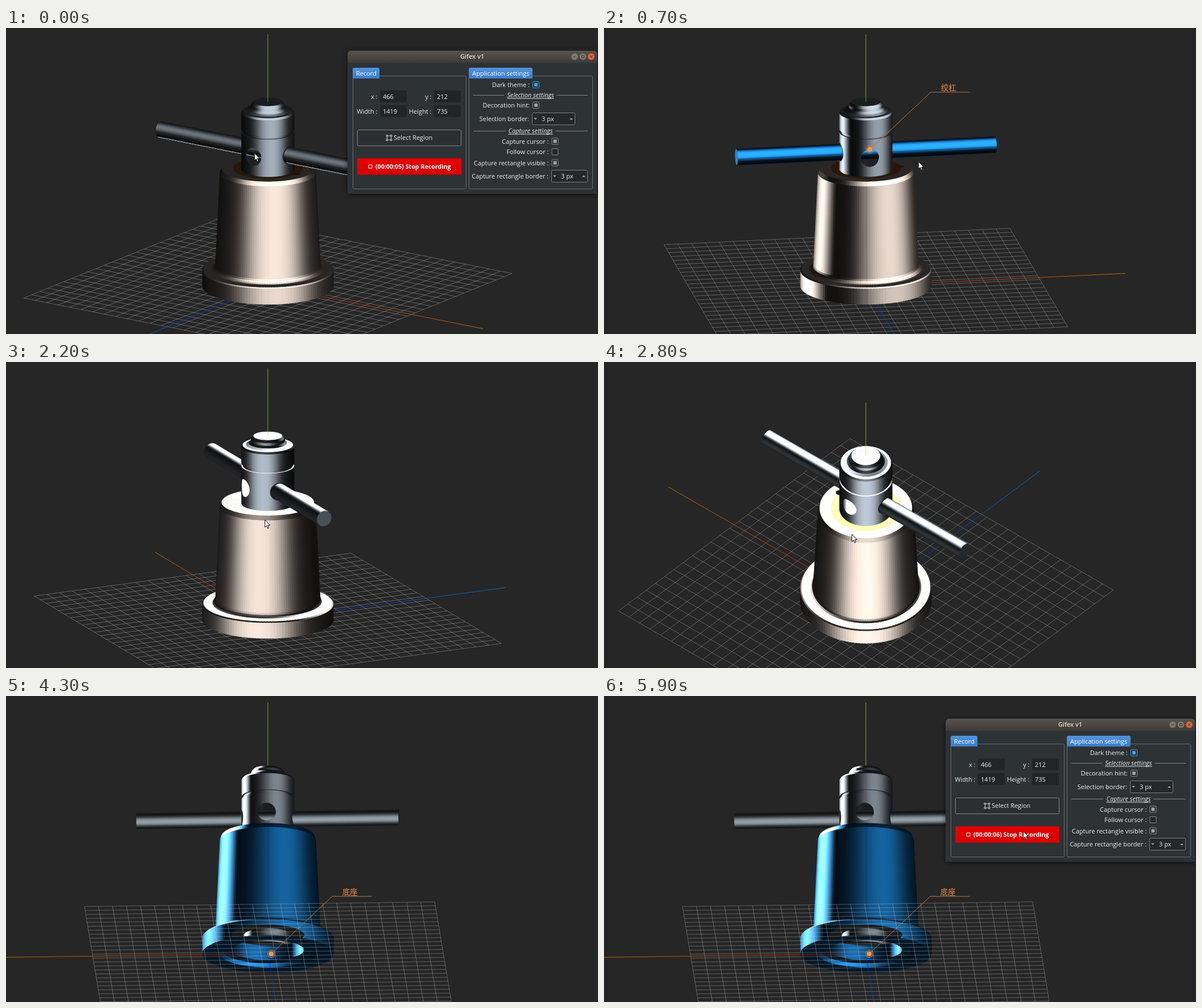
An HTML page with a canvas for the animation above (6 s loop, 1040 by 539 pixels).

```html
<!DOCTYPE html>
<html lang="en">
<head>
<meta charset="utf-8">
<title>Screw jack viewer</title>
<style>
html, body { margin: 0; width: 100%; height: 100%; overflow: hidden; background: #262626; }
canvas { display: block; width: 1040px; height: 539px; }
</style>
</head>
<body>
<canvas id="stage" width="1040" height="539"></canvas>
<script>
const ctx = document.getElementById('stage').getContext('2d');
const LOOP = 6000, STEP = 100, RAD = Math.PI / 180, TAU = Math.PI * 2;
const UI = '"Open Sans", "Noto Sans", sans-serif';

// camera drags: start, end, yaw and pitch reached (degrees)
const DRAGS = [
  [0, 300, -31, 16.6], [400, 700, 9.5, 16.6], [700, 900, 14, 7], [1000, 1700, 88, -14.6],
  [1800, 2500, 136, 40], [2500, 2800, 138.7, 41], [2800, 3200, 176, 37.4], [3400, 3900, 177.3, -16.5]
];
// pointer path: time, x, y
const PATH = [
  [0, 436, 220], [400, 441, 221], [700, 552, 235], [1500, 477, 248], [2800, 435, 303],
  [3400, 479, 330], [3900, 452, 287], [4200, 6, 339], [5100, 88, 345], [5700, 738, 237], [6000, 735, 238]
];

const BRONZE = [1, .93, .88], STEEL = [.7, .75, .8], ORANGE = [1, .6, .28], BLUE = [.13, .62, 1];
const LIGHTS = [{ az: 52, el: 38, k: 3.4 }, { az: -136, el: -32, k: 1.5 }];

// concave quarter curve from radius r + w inward to r
const cove = (r, w, h, rise) => [0, 1, 2, 3, 4].map(i => {
  const a = i / 4 * Math.PI / 2;
  return [r + w * (1 - Math.sin(a)), h + rise * (1 - Math.cos(a))];
});

// lathe outlines as [radius, height]
const BASE = [[115, 0], [115, 29], [113, 31], ...cove(92, 8, 31, 9), [84, 208], [81, 216], [61, 216]];
const RING = [[61, 216], [46, 216]];
const BODY = [[46, 214], [46, 283], [43, 283], [43, 288], [46, 288], [46, 318],
  ...cove(28.5, 15.5, 321.5, 12), [25, 338], [0, 338]];
const SCREW = [[0, 12], [36, 12], [42, 18], [42, 34], [64, 34]];
const CAVITY = [[64, 34], [64, 7], [80, 6], [85, 0], [115, 0]];

const GRID = 308, CELLS = 25, AXIS = 462, BODY_R = 46, ROD_H = 248, ROD_R = 14, ROD_END = 230.5;
let yaw, st, ct, s, c, lamps;

const dot = (a, b) => a[0] * b[0] + a[1] * b[1] + a[2] * b[2];
const mix = (a, b, f) => a + (b - a) * f;

function camera(t) {
  let y = -35, p = 16.6;
  for (const [from, to, y1, p1] of DRAGS) {
    const f = Math.max(0, Math.min(1, (t - from) / (to - from)));
    y = mix(y, y1, f);
    p = mix(p, p1, f);
  }
  return [y, p];
}

function pointerAt(t) {
  const i = PATH.findIndex(k => k[0] > t), a = PATH[i - 1], b = PATH[i];
  const f = (t - a[0]) / (b[0] - a[0]);
  return [mix(a[1], b[1], f), mix(a[2], b[2], f)];
}

function setView(yawDeg, pitchDeg) {
  yaw = yawDeg * RAD;
  st = Math.sin(yaw); ct = Math.cos(yaw);
  s = Math.sin(pitchDeg * RAD); c = Math.cos(pitchDeg * RAD);
  lamps = LIGHTS.map(({ az, el, k }) => {
    const f = az * RAD + yaw, e = el * RAD;
    const v = [Math.cos(e) * Math.sin(f), Math.sin(e), Math.cos(e) * Math.cos(f)];
    const sum = [v[0], v[1] + s, v[2] + c], len = Math.hypot(...sum);
    const h = sum.map(q => q / len);
    return { v, k, h, graze: (1 - h[1] * s - h[2] * c) ** 2 };
  });
}

// x: right, h: up, d: toward the viewer
const flat = (x, h, d) => [460 + x, 294 + (167 - h) * c + s * d];
const world = (X, h, Z) => flat(X * ct + Z * st, h, Z * ct - X * st);
const faces = n => n[1] * s + n[2] * c > 0;

// metallic highlight plus a white sheen at grazing angles
function shade(mat, n) {
  let sum = .05, sheen = 0;
  for (const l of lamps) {
    const nl = dot(n, l.v);
    if (nl <= 0) continue;
    const spec = l.k * Math.min(1, 3 * nl) * Math.max(0, dot(n, l.h)) ** 9;
    sum += .1 * nl + spec;
    sheen += spec * l.graze;
  }
  const tone = 1.1 * (1 - Math.exp(-1.4 * sum));
  return `rgb(${mat.map(m => Math.min(255, Math.round(255 * (m * tone + sheen)))).join()})`;
}

function trace(pts) {
  ctx.beginPath();
  pts.forEach(p => ctx.lineTo(p[0], p[1]));
  ctx.closePath();
}

function facet(pts, color) {
  trace(pts);
  ctx.fillStyle = ctx.strokeStyle = color;
  ctx.lineWidth = .4;
  ctx.fill();
  ctx.stroke();
}

function line(pts, color, width = 1) {
  ctx.beginPath();
  pts.forEach(p => ctx.lineTo(p[0], p[1]));
  ctx.strokeStyle = color;
  ctx.lineWidth = width;
  ctx.stroke();
}

function circle(x, y, r, fill, stroke) {
  ctx.beginPath();
  ctx.arc(x, y, r, 0, TAU);
  if (fill) { ctx.fillStyle = fill; ctx.fill(); }
  if (stroke) { ctx.strokeStyle = stroke; ctx.lineWidth = 1; ctx.stroke(); }
}

const loop = (n, at) => Array.from({ length: n }, (_, k) => at(k / n * TAU));

// facets around an axis, each reaching under the next so no seam shows
function wrap(count, mat, normal, low, high) {
  const step = TAU / count;
  for (let k = 0; k < count; k++) {
    const a = k * step, b = a + step * 1.5, n = normal(a + step / 2);
    if (faces(n)) facet([low(a), low(b), high(b), high(a)], shade(mat, n));
  }
}

function lathe(outline, mat, downward) {
  const last = outline.length - 1;
  for (let i = 0; i < last; i++) {
    const j = downward ? last - 1 - i : i;
    const [r0, h0] = outline[j], [r1, h1] = outline[j + 1];
    const len = Math.hypot(h1 - h0, r1 - r0), nr = (h1 - h0) / len, nh = (r0 - r1) / len;
    const at = (r, h) => f => flat(r * Math.sin(f), h, r * Math.cos(f));
    wrap(140, mat, f => [nr * Math.sin(f), nh, nr * Math.cos(f)], at(r0, h0), at(r1, h1));
  }
}

const rodPoint = (X, f) => world(X, ROD_H + ROD_R * Math.sin(f), ROD_R * Math.cos(f));

function tube(mat, from, to) {
  wrap(60, mat, f => [Math.cos(f) * st, Math.sin(f), Math.cos(f) * ct],
    f => rodPoint(from(f), f), f => rodPoint(to, f));
}

function rodHalf(mat, side) {
  tube(mat, f => side * Math.sqrt(BODY_R ** 2 - (ROD_R * Math.cos(f)) ** 2), side * ROD_END);
  const n = [side * ct, 0, -side * st];
  if (faces(n)) facet(loop(32, f => rodPoint(side * ROD_END, f)), shade(mat, n));
}

function bore(az, open, rodMat) {
  const mid = Math.atan2(Math.sin(az + yaw), Math.cos(az + yaw)), R = 16, edge = Math.PI / 2;
  if (Math.abs(mid) > 1.85) return;
  const pts = loop(36, f => {
    const phi = Math.max(-edge, Math.min(edge, mid + Math.asin(R * Math.cos(f) / BODY_R)));
    return flat(BODY_R * Math.sin(phi), ROD_H + R * Math.sin(f), BODY_R * Math.cos(phi));
  });
  if (!open) return facet(pts, '#17191c');
  const x = 460 + BODY_R * Math.sin(mid), g = ctx.createLinearGradient(x - 16, 0, x + 16, 0);
  g.addColorStop(0, '#121315');
  g.addColorStop(.2, '#24272a');
  g.addColorStop(.4, shade(STEEL, [0, Math.sign(s) || 1, 0]));
  ctx.save();
  trace(pts);
  ctx.clip();
  ctx.fillStyle = g;
  ctx.fillRect(x - 40, 0, 80, 539);
  tube(rodMat, () => -BODY_R, BODY_R);
  ctx.restore();
}

function axis(dir, start, near, far) {
  const [a, o, b] = [start, 0, AXIS].map(q => world(...dir.map(v => v * q)));
  const g = ctx.createLinearGradient(...o, ...b);
  g.addColorStop(0, near);
  g.addColorStop(1, far);
  ctx.globalAlpha = .65;
  line([a, b], g);
  ctx.globalAlpha = 1;
}

function ground() {
  const color = 'rgba(205,205,205,.48)';
  for (let i = 0; i <= CELLS; i++) {
    const q = mix(-GRID, GRID, i / CELLS);
    line([world(q, 0, -GRID), world(q, 0, GRID)], color, .75);
    line([world(-GRID, 0, q), world(GRID, 0, q)], color, .75);
  }
  const start = s < 0 ? 38 : 0;
  axis([1, 0, 0], start, '#ff0000', '#ff9900');
  axis([0, 0, 1], start, '#0000ff', '#0099ff');
}

const upAxis = () => axis([0, 1, 0], 338, '#00ff00', '#99ff00');

function spindle(rodMat, below) {
  const near = st < 0 ? 1 : -1;
  rodHalf(rodMat, -near);
  lathe(BODY, STEEL, below);
  for (let i = 0; i < 4; i++) bore(i * TAU / 4, i % 2 === 0, rodMat);
  rodHalf(rodMat, near);
}

function model(rodMat, baseMat) {
  if (s >= 0) {
    ground();
    lathe(BASE, baseMat);
    lathe(RING, ORANGE);
    facet(loop(20, f => world(62 + 6 * Math.cos(f), 216, 6 * Math.sin(f))), '#1c1512');
    spindle(rodMat, false);
    upAxis();
  } else {
    upAxis();
    spindle(rodMat, true);
    lathe(BASE, baseMat, true);
    lathe(SCREW, STEEL, true);
    lathe(CAVITY, baseMat);
    ground();
  }
}

function text(str, x, y, o = {}) {
  ctx.font = o.font || `11px ${UI}`;
  ctx.fillStyle = o.color || '#eeeeec';
  ctx.textAlign = o.align || 'left';
  ctx.textBaseline = 'alphabetic';
  ctx.fillText(str, x, y);
}

function label(str, x, y) {
  line([[x, y], [x + 107, y - 101], [x + 176.5, y - 101]], '#b97540');
  circle(x, y, 6.5, null, '#d98547');
  circle(x, y, 4.5, '#f79550');
  text(str, x + 125, y - 104, { font: '13.3px "Noto Sans CJK SC", "Noto Sans CJK", sans-serif', color: '#f0914d' });
}

function box(x, y, w, h, fill, stroke, r = 2) {
  ctx.beginPath();
  ctx.roundRect(x, y, w, h, r);
  if (fill) { ctx.fillStyle = fill; ctx.fill(); }
  if (stroke) { ctx.strokeStyle = stroke; ctx.lineWidth = 1; ctx.stroke(); }
}

function fade(y0, y1, a, b) {
  const g = ctx.createLinearGradient(0, y0, 0, y1);
  g.addColorStop(0, a);
  g.addColorStop(1, b);
  return g;
}

function group(title, x, w, tab) {
  box(x + .5, 84.5, w, 199, null, '#6a6e71');
  box(x, 70, tab, 19, fade(70, 89, '#5294dc', '#3a7ccb'), null, [3, 3, 0, 0]);
  text(title, x + 6, 84, { color: '#fff' });
}

function field(name, value, x, y) {
  text(name, x - 4.5, y + 4, { align: 'right' });
  box(x, y - 11, 47, 21, '#222528');
  text(value, x + 5, y + 4);
}

function check(name, x, y, color) {
  text(name, x - 11, y + 4, { align: 'right' });
  box(x - 5.5, y - 5.5, 11, 11, '#25292c', color === '#42a5e8' ? color : '#8b8e90', 1);
  if (color) box(x - 3, y - 3, 6, 6, color, null, 0);
}

function spin(name, x, y, w) {
  text(name, x - 5, y + 4, { align: 'right' });
  box(x + .5, y - 10.5, w, 21, '#24282b', '#7c7f81');
  text('3 px', x + 17, y + 4);
  ctx.fillStyle = '#aaa';
  for (const [px, d] of [[x + 6, 1.5], [x + w - 6, -1.5]]) {
    trace([[px - 3, y - d], [px + 3, y - d], [px, y + d]]);
    ctx.fill();
  }
}

function section(title, y) {
  const mid = 921.5;
  text(title, mid, y + 4, { font: `italic 11px ${UI}`, align: 'center' });
  const half = ctx.measureText(title).width / 2;
  line([[821, y + .5], [mid - half - 5, y + .5]], '#85888a');
  line([[mid + half + 5, y + .5], [1022, y + .5]], '#85888a');
  line([[mid - half, y + 6], [mid + half, y + 6]], '#eeeeec');
}

function windowButtons() {
  for (let i = 0; i < 3; i++) {
    const x = 999 + 14.5 * i, y = 50.5, dark = '#3a3834';
    circle(x, y, 5.7, i < 2 ? '#7d7a73' : '#e8603c');
    if (i === 0) line([[x - 2.5, y], [x + 2.5, y]], dark);
    if (i === 1) box(x - 2, y - 2, 4, 4, null, dark, 0);
    if (i === 2) for (const d of [-2, 2]) line([[x - 2, y - d], [x + 2, y + d]], dark);
  }
}

function panel(clock) {
  ctx.save();
  ctx.shadowColor = 'rgba(0,0,0,.6)';
  ctx.shadowBlur = 10;
  ctx.shadowOffsetY = 2;
  box(600, 40, 438.5, 252, '#2d3235', null, [6, 6, 0, 0]);
  ctx.restore();
  box(600, 40, 438.5, 21.5, fade(40, 61, '#58544e', '#3f3c38'), null, [6, 6, 0, 0]);
  text('Gifex v1', 819, 54, { font: `600 11px ${UI}`, align: 'center', color: '#dfdbd2' });
  windowButtons();

  group('Record', 609, 199, 47);
  field('x :', '466', 657, 121);
  field('y :', '212', 752, 121);
  field('Width :', '1419', 657, 147);
  field('Height :', '735', 752, 147);
  box(617.5, 179.5, 182, 28, '#2b2f32', '#85888a');
  box(669.5, 190, 7, 7, null, '#c8c8c8', 0);
  for (const x of [668, 675.5]) for (const y of [188.5, 196]) box(x, y, 2.5, 2.5, '#2b2f32', '#c8c8c8', 0);
  text('Select Region', 681, 197);
  box(617, 229.5, 183, 29, fade(230, 258, '#e40000', '#d90000'), null, 1);
  box(637, 241, 6, 6, null, '#fff', 0);
  text(`(${clock}) Stop Recording`, 649, 248, { font: `bold 10.7px ${UI}`, color: '#fff' });

  group('Application settings', 813, 217, 112);
  check('Dark theme :', 931, 100, '#42a5e8');
  section('Selection settings', 118);
  check('Decoration hint:', 931, 136, '#a0a2a3');
  spin('Selection border:', 924, 160, 75);
  section('Capture settings', 181);
  check('Capture cursor :', 964.5, 199.5, '#a0a2a3');
  check('Follow cursor :', 964.5, 218);
  check('Capture rectangle visible :', 964.5, 237.5, '#a0a2a3');
  spin('Capture rectangle border :', 958, 261, 63);
}

function pointer(x, y) {
  const shape = [[0, 0], [0, 13], [3, 10], [5, 15], [7, 14], [5, 9.5], [9, 9.5]];
  trace(shape.map(p => [x + p[0] + .5, y + p[1] + .5]));
  ctx.fillStyle = '#fff';
  ctx.fill();
  ctx.strokeStyle = '#111';
  ctx.lineWidth = 1;
  ctx.stroke();
}

function draw(t) {
  const rodOn = t >= 600 && t < 900, baseOn = t >= 3800;
  setView(...camera(t));
  ctx.fillStyle = '#262626';
  ctx.fillRect(0, 0, 1040, 539);
  ctx.lineJoin = 'round';
  model(rodOn ? BLUE : STEEL, baseOn ? BLUE : BRONZE);
  if (rodOn) label('绞杠', 467, 214);
  if (baseOn) label('底座', 466, 454);
  if (t < 100 || t >= 5300) panel(t >= 5800 ? '00:00:06' : '00:00:05');
  if (t < 4300 || t >= 5100) pointer(...pointerAt(t));
}

const begin = performance.now();
let shown = -1;
function tick() {
  const t = Math.floor((performance.now() - begin) % LOOP / STEP) * STEP;
  if (t !== shown) draw(shown = t);
  requestAnimationFrame(tick);
}
tick();
</script>
</body>
</html>
```
